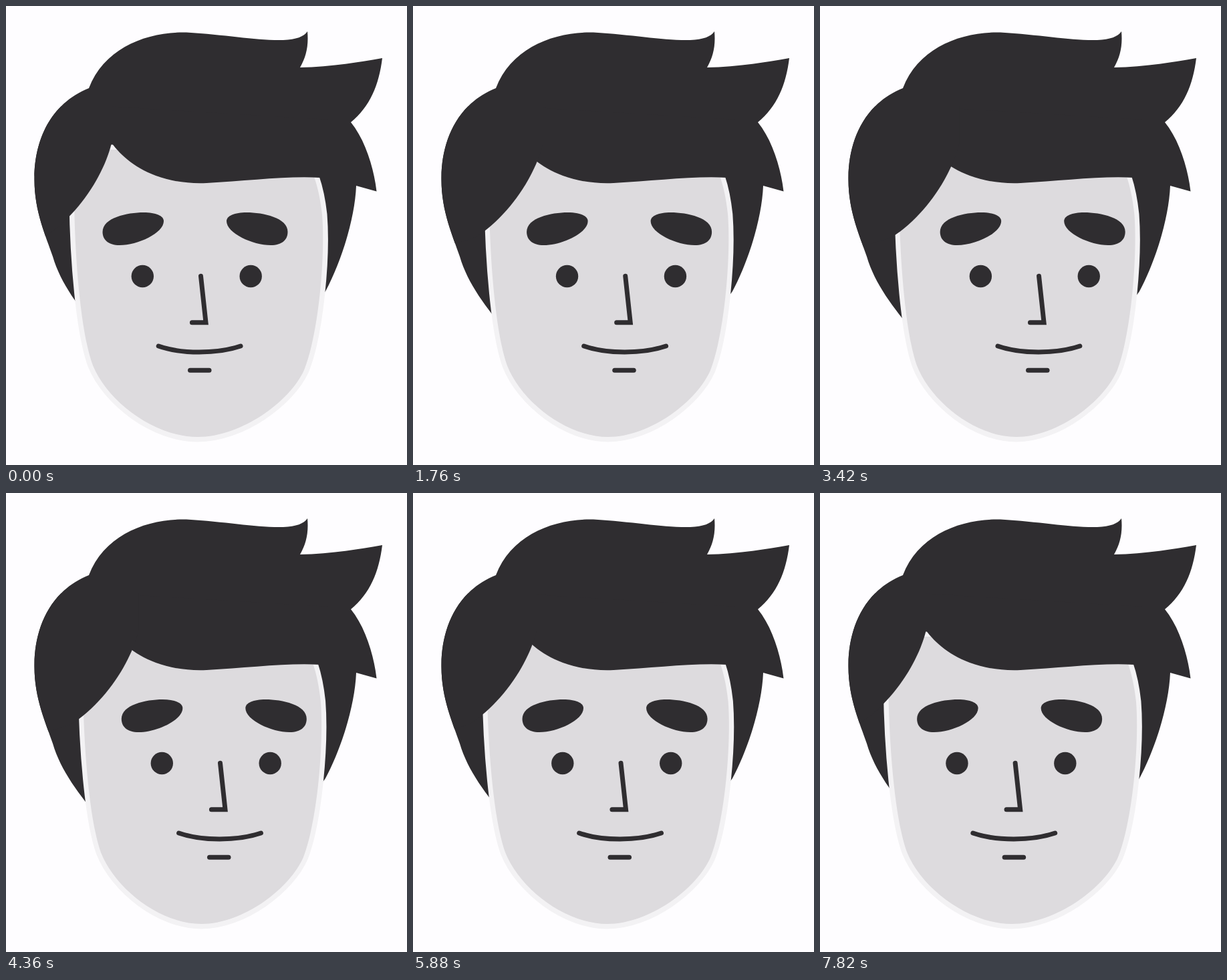
These frames come from a looping animation (600 px wide and 687 px high, 7850 ms). An HTML page:

```html
<!DOCTYPE html>
<html lang="en">
<head>
<meta charset="utf-8">
<title>Turning head</title>
<style>
  html, body { margin: 0; width: 100%; height: 100%; overflow: hidden; background: #fefdff; }
  svg { display: block; width: 100vw; height: 100vh; }
  .ink { fill: #2f2d30; }
  .line { fill: none; stroke: #2f2d30; stroke-width: 7; stroke-linecap: round; }
  #face { fill: #dddbde; stroke: #f3f2f4; stroke-width: 15; paint-order: stroke; }
</style>
</head>
<body>
<svg viewBox="0 0 600 687">
  <defs>
    <path id="hair" d="M124 123C147 62 212 38 270 39.5C330 43 375 52 415 51C434 50 446 46 451 38C453 60 449 76 440 92C480 91 520 86 563 78C558 118 545 150 516 174C537 200 550 240 554.5 277.5L524 269C522 318 502 382 478 427L440 480L140 488C110 452 82 416 70 375C60 345 42.5 308 42.5 260C42 205 64 147 124 123Z"/>
    <path id="brow" d="M144.5 338C144.5 317 181 309 206 309C224 309 236 314 236 322C236 340 197 358 170 358C153 358 144.5 350 144.5 338Z"/>
    <clipPath id="inHair"><use href="#hair"/></clipPath>
  </defs>
  <use href="#hair" class="ink"/>
  <path id="face" d="M103 215L102 290C103 380 112 490 130 538C152 592 222 645 287 645C352 645 425 592 446 545C468 490 478 375 473 312C470 285 465 265 458 248V215Z"/>
  <path class="ink" d="M158 205C180 235 225 268 300 265C360 262 420 254 470 257L482 258V170L150 150Z"/>
  <g clip-path="url(#inHair)">
    <path class="ink" data-travel="57.5" d="M158 205C146 255 106 315 57 346L-40 378V150H158Z"/>
  </g>
  <g class="ink" data-travel="40">
    <use href="#brow"/>
    <use href="#brow" transform="matrix(-1 0 0 1 566 0)"/>
  </g>
  <g data-travel="41">
    <circle class="ink" cx="204.3" cy="404.5" r="16.7"/>
    <circle class="ink" cx="366.2" cy="404.5" r="16.7"/>
    <path class="line" d="M291.5 404.3L299 473.7H278.4"/>
    <path class="line" d="M275.5 545.2H304"/>
  </g>
  <path class="line" data-travel="43" d="M228.2 509C262 521 316 521 351 509"/>
</svg>
<script>
  const LOOP = 7850, HALF = 1312, STARTS = [40, 2665, 5430];
  const FACE_PIVOT = 422, FACE_SQUEEZE = 0.058;
  const face = document.getElementById('face');
  const movers = document.querySelectorAll('[data-travel]');

  // cubic-bezier(.5, 0, .1, 1), solved by bisection
  function ease(x) {
    let lo = 0, hi = 1, t;
    for (let i = 0; i < 24; i++) {
      t = (lo + hi) / 2;
      const r = 1 - t;
      if (1.5 * r * r * t + 0.3 * r * t * t + t * t * t < x) lo = t; else hi = t;
    }
    return t * t * (3 - 2 * t);
  }

  // 0 = facing left, 1 = turned right
  function turn(t) {
    const start = STARTS.findLast(s => s <= t) ?? t;
    const u = (t - start) / HALF;
    return u < 1 ? ease(u) : 1 - ease(Math.min(u - 1, 1));
  }

  function draw(time) {
    const k = turn(time % LOOP);
    const scale = 1 - FACE_SQUEEZE * k;
    face.setAttribute('transform', `matrix(${scale} 0 0 1 ${FACE_PIVOT * (1 - scale)} 0)`);
    for (const el of movers) el.setAttribute('transform', `translate(${el.dataset.travel * k} 0)`);
  }

  let origin;
  function tick(now) {
    origin ??= now;
    draw(now - origin);
    requestAnimationFrame(tick);
  }
  draw(0);
  requestAnimationFrame(tick);
</script>
</body>
</html>
```
